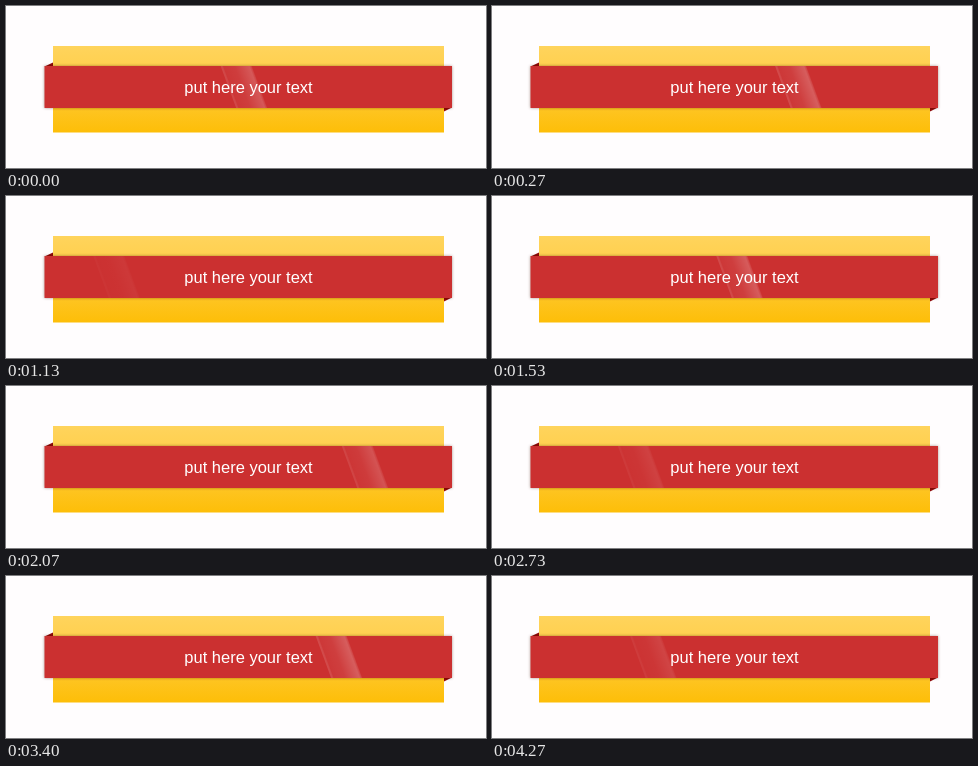
Write an HTML page that moves like this. It is 480 by 162 pixels and loops after 4.34 s.

```html
<!DOCTYPE html>
<html lang="en">
<head>
<meta charset="utf-8">
<title>Ribbon banner</title>
<style>
  html, body { margin: 0; width: 100%; height: 100%; overflow: hidden; background: #fffdfe; }
  svg { display: block; width: 480px; height: 162px; }
  .ribbon { fill: #cb3030; filter: drop-shadow(0 0 1.5px rgba(60, 20, 0, .45)); }
  .fold { fill: #8f0808; }
  text { font: 16.5px "Liberation Sans", Arial, sans-serif; fill: #fff; text-anchor: middle; }
</style>
</head>
<body>
<svg viewBox="0 0 480 162">
  <defs>
    <linearGradient id="gold" x2="0" y2="1">
      <stop offset="0" stop-color="#ffd45c"/>
      <stop offset=".25" stop-color="#ffd04f"/>
      <stop offset="1" stop-color="#fdbe08"/>
    </linearGradient>
    <linearGradient id="gloss">
      <stop offset="0" stop-color="#fff" stop-opacity=".14"/>
      <stop offset=".05" stop-color="#fff" stop-opacity=".12"/>
      <stop offset=".09" stop-color="#fff" stop-opacity=".04"/>
      <stop offset=".45" stop-color="#fff" stop-opacity=".07"/>
      <stop offset=".92" stop-color="#fff" stop-opacity=".22"/>
      <stop offset="1" stop-color="#fff" stop-opacity=".08"/>
    </linearGradient>
    <clipPath id="band"><rect x="38.5" y="60" width="407.5" height="42"/></clipPath>
  </defs>
  <rect x="47" y="40" width="391" height="86.5" fill="url(#gold)"/>
  <path class="fold" d="M38.5 60.5L47 56.5V60.5ZM446 101.5L438 105.5V101.5Z"/>
  <rect class="ribbon" x="38.5" y="60" width="407.5" height="42"/>
  <g clip-path="url(#band)">
    <rect id="shine" x="-31" width="31" height="42" fill="url(#gloss)"/>
  </g>
  <text x="242.5" y="87">put here your text</text>
</svg>
<script>
  const LOOP = 4340, SWEEP = 1500, LEAD = 470, STEP = 1000 / 15;
  const shine = document.getElementById('shine');

  function draw(now) {
    const step = Math.min(64, Math.floor((now % LOOP + 5) / STEP));
    const p = ((step * STEP + LEAD) % SWEEP) / SWEEP;
    const x = 91 + 322 * (1 - (1 - p) ** 2);
    const alpha = Math.min(1, p / .35, (1 - p) / .4);
    shine.setAttribute('transform', `translate(${x - 15.5} 60) skewX(20.25)`);
    shine.setAttribute('opacity', alpha);
  }

  const start = performance.now();
  function tick() {
    draw(performance.now() - start);
    requestAnimationFrame(tick);
  }
  tick();
</script>
</body>
</html>
```
